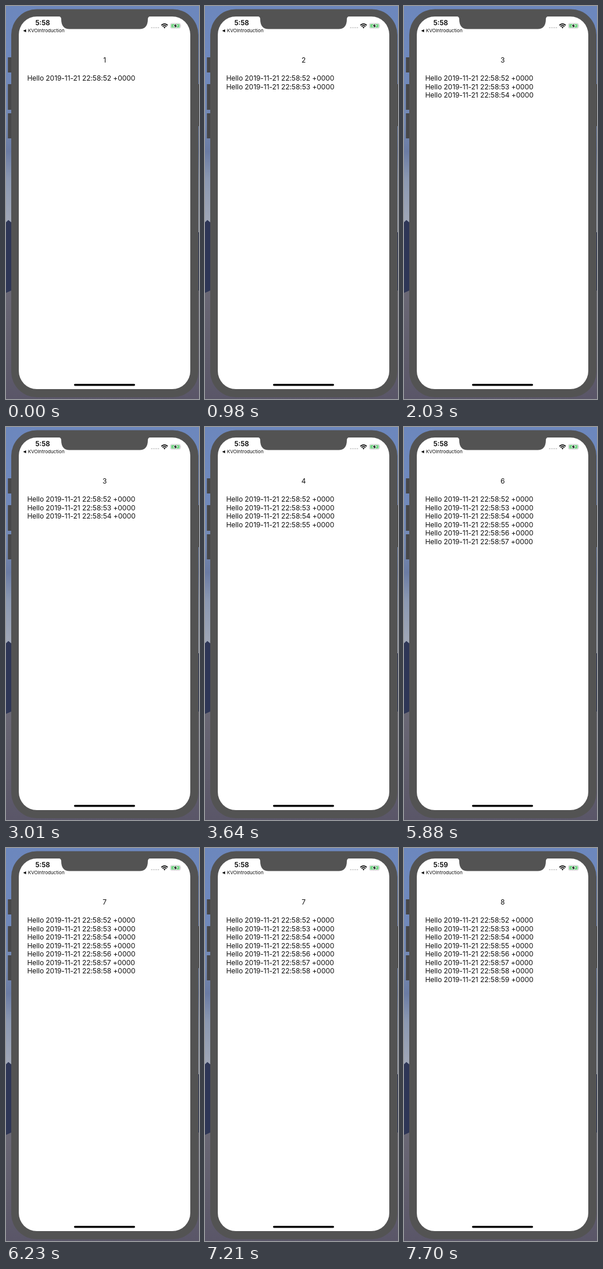
An HTML page for the animation above (8 s loop, 332 by 674 pixels).

```html
<!DOCTYPE html>
<html lang="en">
<head>
<meta charset="utf-8">
<title>Counter log</title>
<style>
  html, body { margin: 0; width: 100%; height: 100%; overflow: hidden; }
  svg { display: block; width: 332px; height: 674px; }
  text { font: 12.1px Inter, "Liberation Sans", sans-serif; letter-spacing: -.1px; fill: #111; white-space: pre; }
  #clock { font-size: 11.5px; font-weight: 600; letter-spacing: 0; text-anchor: middle; fill: #000; }
  #count { text-anchor: middle; letter-spacing: 0; }
  #back { font-size: 8.2px; letter-spacing: -.04px; }
</style>
</head>
<body>
<svg viewBox="0 0 332 674">
  <defs>
    <linearGradient id="sky" x2="0" y2="1">
      <stop offset="0" stop-color="#6c87bd"/>
      <stop offset=".14" stop-color="#6f89be"/>
      <stop offset=".3" stop-color="#7489b3"/>
      <stop offset=".37" stop-color="#6b7ca4"/>
      <stop offset=".44" stop-color="#8b98b1"/>
      <stop offset=".55" stop-color="#a0a7b7"/>
    </linearGradient>
    <linearGradient id="ground" x2="0" y2="1">
      <stop offset="0" stop-color="#6a6875"/>
      <stop offset="1" stop-color="#5a5668"/>
    </linearGradient>
  </defs>

  <!-- wallpaper -->
  <path fill="url(#sky)" d="M0 0H332V674H0z"/>
  <path fill="#2e3656" d="M0 371L4 367 9 371V495H0zM329 388H332V500H329z"/>
  <path fill="url(#ground)" d="M0 492L9 488H332V674H0z"/>

  <!-- phone -->
  <path fill="#474749" d="M3.300 88H10V114H3.300zM3.300 134H10V178H3.300zM3.300 184H10V227H3.300zM329 134H332V206H329z"/>
  <rect x="9" y="5.5" width="322" height="665.5" rx="44" fill="#535353"/>
  <rect x="22" y="18" width="295" height="639" rx="31" fill="#fff"/>
  <path fill="#535353" d="M90 17.500Q95 18 95 22.500C95 34 100 39.500 109 39.500H230C239 39.500 244 34 244 22.500Q244 18 249 17.500z"/>
  <rect x="117" y="648" width="105" height="3.500" rx="1.750"/>

  <!-- status bar -->
  <text id="clock" x="63" y="33"></text>
  <path d="M29.500 42.500L34.500 40V45z"/>
  <text id="back" x="37.700" y="45.200">KVOIntroduction</text>
  <path stroke="#c4c4c4" stroke-width="1.600" stroke-dasharray="2.400 1.400" d="M249.500 37.200H263.300"/>
  <g fill="none" stroke="#000" stroke-width="1.700">
    <path d="M267.300 33Q272.700 28.200 278.100 33M269.300 35.100Q272.700 32 276.100 35.100"/>
    <path fill="#000" stroke="none" d="M270.900 36.500Q272.700 35.200 274.500 36.500L272.700 38.400z"/>
  </g>
  <rect x="283" y="29.900" width="16.800" height="8.200" rx="2.200" fill="#fff" stroke="#aaa" stroke-width=".7"/>
  <rect x="284.200" y="31.100" width="14.400" height="5.800" rx="1.200" fill="#71d583"/>
  <path fill="#aaa" d="M300.600 32.700Q301.900 34 300.600 35.300z"/>
  <path stroke="#fff" stroke-width="1.600" paint-order="stroke" d="M292.600 30L288.600 34.500H291.200L290.200 38 294.300 33.500H291.700z"/>

  <!-- content -->
  <text id="count" x="169.700" y="97"></text>
  <g id="log"></g>
</svg>
<script>
  const LOOP = 8000, TICK = 1050, LEAD = 70, MINUTE = 7630;
  const $ = id => document.getElementById(id);

  const lines = Array.from({ length: 8 }, (_, i) => {
    const line = document.createElementNS('http://www.w3.org/2000/svg', 'text');
    line.setAttribute('x', 36.4);
    line.setAttribute('y', 128.4 + i * 14.46);
    line.textContent = `Hello 2019-11-21 22:58:${52 + i} +0000`;
    return $('log').appendChild(line);
  });

  function draw() {
    const t = performance.now() % LOOP;
    const count = 1 + Math.floor((t + LEAD) / TICK);
    $('count').textContent = count;
    $('clock').textContent = t < MINUTE ? '5:58' : '5:59';
    lines.forEach((line, i) => line.setAttribute('visibility', i < count ? 'visible' : 'hidden'));
    requestAnimationFrame(draw);
  }
  draw();
</script>
</body>
</html>
```
